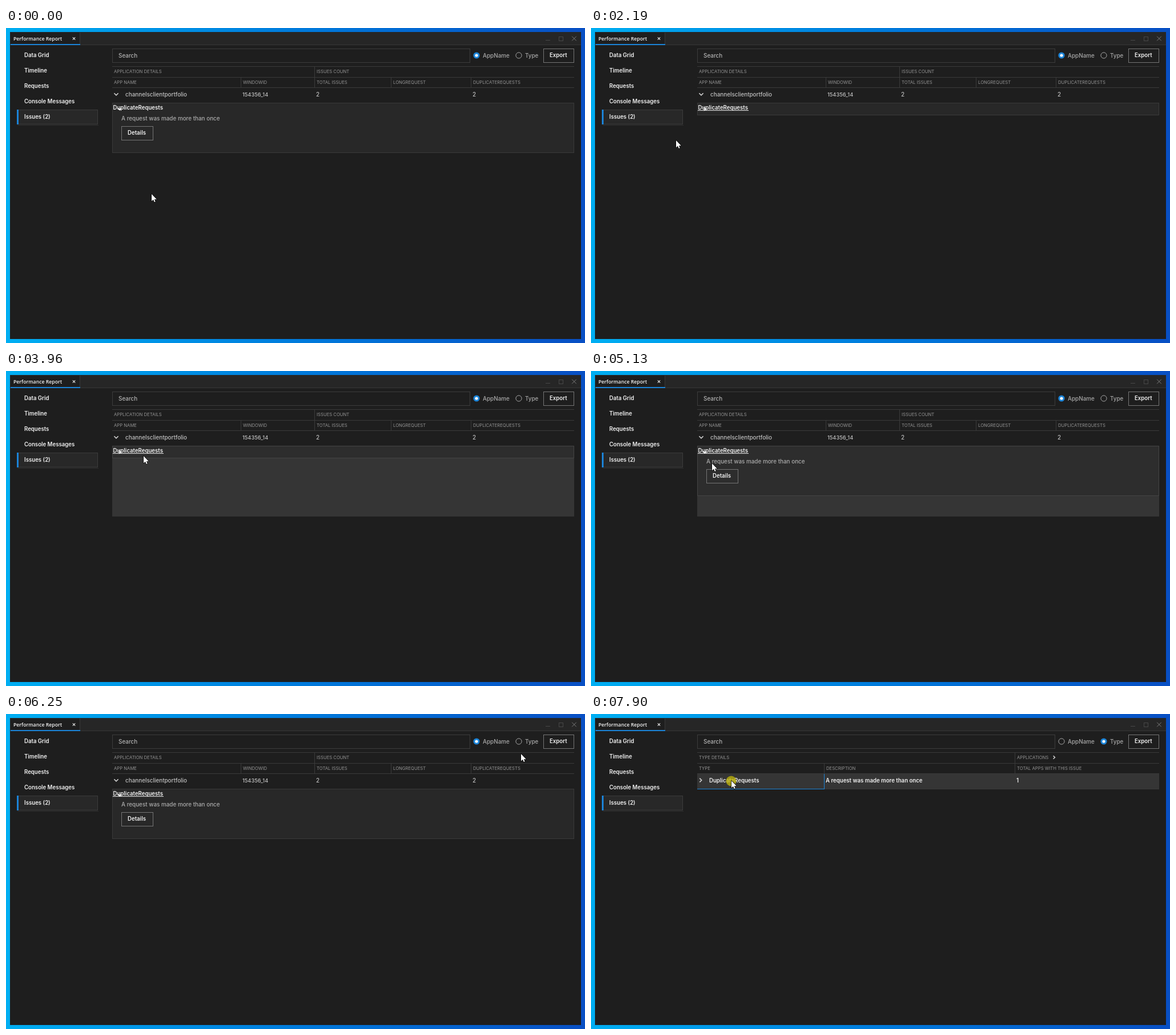
An HTML page with a canvas for the animation above (8000 ms loop, 1014 by 552 pixels).

```html
<!DOCTYPE html>
<html lang="en">
<head>
<meta charset="utf-8">
<title>Performance Report</title>
<style>
html, body { margin: 0; width: 100%; height: 100%; overflow: hidden; background: #1e1e1e; }
canvas { display: block; width: 1014px; height: 552px; }
</style>
</head>
<body>
<canvas id="stage" width="1014" height="552"></canvas>
<script>
const ctx = document.getElementById('stage').getContext('2d');
const LOOP = 8000;
const SANS = 'Inter, sans-serif';
const BLUE = '#1b84d8', LINE = '#3a3a3a', BG = '#1e1e1e';
const FONT = {
  tab: '600 8.7px "Open Sans", sans-serif',
  strong: '600 9.65px ' + SANS,
  body: '500 9.9px ' + SANS,
  id: '500 9.2px ' + SANS,
  head: '400 7.7px ' + SANS
};

// Pointer path: time, x, y of the hotspot
const PATH = [
  [0, 255, 291], [530, 255, 291], [1320, 230, 141], [1660, 230, 141],
  [2400, 106, 225], [2530, 82, 238], [2950, 258, 163], [3080, 258, 163],
  [3230, 178, 214], [3360, 140, 240], [3500, 140, 240], [3960, 241, 149],
  [4050, 231, 138], [4950, 231, 138], [5550, 146, 246], [5950, 146, 246],
  [6040, 501, 170], [6250, 902, 70], [6740, 897, 45], [6880, 897, 45],
  [7640, 245, 118], [7670, 246, 117], [8000, 246, 117]
];
const CLICKS = [[1620, 1740], [4250, 4390], [6740, 6850], [7900, 8000]];
const HOVERS = [[820, 1980], [2640, 3230], [3620, 5200]];
const COLLAPSE = 1680, EXPAND = 4320, LINKED = 1230, SWITCH = 6850, SELECT = 7900;

const clamp = v => Math.max(0, Math.min(1, v));

function slope(i, k) {
  const a = PATH[i], b = PATH[i + 1];
  return (b[k] - a[k]) / (b[0] - a[0]);
}

// Tangent that never overshoots and rests at pauses
function tangent(i, k) {
  if (i === 0 || i === PATH.length - 1) return 0;
  const p = slope(i - 1, k), q = slope(i, k);
  return p * q > 0 ? 2 * p * q / (p + q) : 0;
}

function pointer(t) {
  let i = 0;
  while (i < PATH.length - 2 && PATH[i + 1][0] <= t) i++;
  const a = PATH[i], b = PATH[i + 1], d = b[0] - a[0], u = (t - a[0]) / d;
  return [1, 2].map(k => {
    const u2 = u * u, u3 = u2 * u;
    return a[k] * (2 * u3 - 3 * u2 + 1) + b[k] * (3 * u2 - 2 * u3)
      + d * (tangent(i, k) * (u3 - 2 * u2 + u) + tangent(i + 1, k) * (u3 - u2));
  });
}

function hoverAmount(t) {
  return HOVERS.reduce((m, [on, off]) =>
    Math.max(m, Math.min(clamp((t - on) / 300), 1 - clamp((t - off) / 130))), 0);
}

function rect(x, y, w, h, color) {
  ctx.fillStyle = color;
  ctx.fillRect(x, y, w, h);
}

function frame(x, y, w, h, color) {
  ctx.strokeStyle = color;
  ctx.lineWidth = 1;
  ctx.strokeRect(x + 0.5, y + 0.5, w - 1, h - 1);
}

function text(s, x, y, font, color) {
  ctx.font = FONT[font];
  ctx.fillStyle = color;
  ctx.fillText(s, x, y);
}

function stroke(points, color, width) {
  ctx.strokeStyle = color;
  ctx.lineWidth = width;
  ctx.beginPath();
  points.forEach(([x, y]) => ctx.lineTo(x, y));
  ctx.stroke();
}

function chevron(x, y, r, down, color = '#d0d0d0') {
  const h = r / 2;
  stroke(down ? [[x - r, y - h], [x, y + h], [x + r, y - h]]
              : [[x - h, y - r], [x + h, y], [x - h, y + r]], color, 1.6);
}

function cross(x, y, r, color, width) {
  stroke([[x - r, y - r], [x + r, y + r]], color, width);
  stroke([[x + r, y - r], [x - r, y + r]], color, width);
}

function disc(x, y, r, color) {
  ctx.fillStyle = color;
  ctx.beginPath();
  ctx.arc(x, y, r, 0, 7);
  ctx.fill();
}

function radio(x, y, on) {
  if (on) {
    disc(x, y, 5.6, BLUE);
    disc(x, y, 2.6, '#fff');
    return;
  }
  ctx.strokeStyle = '#a4a4a4';
  ctx.lineWidth = 1;
  ctx.beginPath();
  ctx.arc(x, y, 5.1, 0, 7);
  ctx.stroke();
}

function button(label, x, y, w, h) {
  frame(x, y, w, h, '#757575');
  text(label, x + 11, y + 15, 'strong', '#f2f2f2');
}

function drawWindow() {
  const sky = ctx.createLinearGradient(0, 0, 1014, 0);
  sky.addColorStop(0, '#00aef2');
  sky.addColorStop(0.5, '#007bdc');
  sky.addColorStop(1, '#084fc4');
  rect(0, 0, 1014, 552, sky);
  rect(7, 7, 1000, 538, BG);
  rect(7, 7, 1000, 22, '#262626');
  rect(7, 29, 1000, 1, '#363636');
  rect(8, 8, 122, 20, BG);
  rect(129, 8, 1, 20, '#383838');
  rect(8, 28, 122, 2, BLUE);
  text('Performance Report', 13, 22, 'tab', '#f4f4f4');
  cross(119, 18.5, 2.2, '#e8e8e8', 1.2);
  rect(945, 21, 8, 1, '#484848');
  frame(968, 15, 8, 8, '#484848');
  cross(995, 18.5, 3.8, '#7c7c7c', 1);
}

function drawNav() {
  rect(19, 143, 142, 26, '#282828');
  frame(19, 143, 142, 26, '#3c3c3c');
  rect(19, 143, 3, 26, BLUE);
  rect(20, 170, 142, 1, '#303030');
  ['Data Grid', 'Timeline', 'Requests', 'Console Messages', 'Issues (2)'].forEach((s, i) =>
    text(s, 32, 51.4 + i * 27, 'strong', '#f2f2f2'));
}

function drawToolbar(byType) {
  frame(186, 36, 627, 25, '#3c3c3c');
  text('Search', 197, 52, 'body', '#b4b4b4');
  radio(824, 48, !byType);
  text('AppName', 835, 51.5, 'body', '#a8a8a8');
  radio(898, 48, byType);
  text('Type', 909, 51.5, 'body', '#a8a8a8');
  button('Export', 941, 36, 54, 25);
}

// Two header rows; cells are [label, x], rules are x positions
function drawHeader(top, cells, tall, short) {
  [67, 86, 104].forEach(y => rect(186, y, 809, 1, LINE));
  rect(tall, 67, 1, 38, LINE);
  short.forEach(x => rect(x, 86, 1, 18, LINE));
  top.forEach(([s, x]) => text(s, x, 79, 'head', '#959595'));
  cells.forEach(([s, x]) => text(s, x, 98.4, 'head', '#959595'));
}

function drawAppView(t) {
  const open = t < COLLAPSE || t >= EXPAND;
  const hover = hoverAmount(t);
  const shade = Math.round(40 + 5 * hover);
  const height = open ? 88 : 22;
  drawHeader([['APPLICATION DETAILS', 189], ['ISSUES COUNT', 544]],
    [['APP NAME', 189], ['WINDOWID', 415], ['TOTAL ISSUES', 544],
     ['LONGREQUEST', 678], ['DUPLICATEREQUESTS', 818]], 540, [411, 674, 814]);
  chevron(193, 116, 3.6, true);
  text('channelsclientportfolio', 209, 120, 'body', '#c0c0c0');
  text('154356_14', 414, 120, 'id', '#c0c0c0');
  text('2', 543, 120, 'body', '#c0c0c0');
  text('2', 817, 120, 'body', '#c0c0c0');

  rect(186, 132, 809, 123, `rgba(53,53,53,${hover})`);
  rect(186, 131, 809, height, `rgb(${shade},${shade},${shade})`);
  frame(186, 131, 809, height, hover > 0.5 ? '#444' : LINE);
  text('DuplicateRequests', 187.5, 143, 'strong', '#f4f4f4');
  chevron(199, 142, 3, open, '#fff');
  if (t >= LINKED) rect(187, 144, 89, 1, '#e8e8e8');
  if (open) {
    text('A request was made more than once', 202, 162, 'body', '#acacac');
    button('Details', 202, 172, 56, 25);
  }
}

function drawTypeView(t, y) {
  const hover = y > 104 && y < 132 && t > 7200;
  const font = hover ? 'strong' : 'body', color = hover ? '#f2f2f2' : '#c0c0c0';
  if (hover) rect(186, 105, 809, 26, '#353535');
  drawHeader([['TYPE DETAILS', 189], ['APPLICATIONS', 746]],
    [['TYPE', 189], ['DESCRIPTION', 412], ['TOTAL APPS WITH THIS ISSUE', 746]], 742, [408]);
  rect(186, 131, 809, 1, LINE);
  chevron(811, 76, 2.8, false);
  chevron(192, 116, 3.4, false);
  text('DuplicateRequests', 207, 120, font, color);
  text('A request was made more than once', 411, 120, font, color);
  text('1', 745, 120, font, color);
  if (t >= SELECT) {
    rect(186, 131, 223, 1, BLUE);
    rect(408, 105, 1, 27, BLUE);
  }
}

const ARROW = new Path2D('M0 0V12.5L2.9 9.8 4.8 14 6.7 13.2 4.9 9.2H8.9Z');
const HAND = new Path2D('M-1.4 1Q0 -.8 1.4 1V4.6Q3 3.8 3.8 5.2 5.4 4.5 6 6 7.8 5.6 7.8 7.5'
  + 'V10.5L6.4 15H.2L-1 12.4 -4 8.8Q-4.4 6.8 -2.6 7.2L-1.4 8.6Z');

function drawPointer(x, y, hand) {
  ctx.save();
  ctx.translate(x, y);
  ctx.lineJoin = 'round';
  ctx.lineWidth = 1.4;
  ctx.strokeStyle = '#000';
  ctx.fillStyle = '#fff';
  const shape = hand ? HAND : ARROW;
  ctx.stroke(shape);
  ctx.fill(shape);
  ctx.restore();
}

function draw(t) {
  const [x, y] = pointer(t);
  const byType = t >= SWITCH;
  drawWindow();
  drawNav();
  drawToolbar(byType);
  if (byType) drawTypeView(t, y);
  else drawAppView(t);
  if (CLICKS.some(([a, b]) => t >= a && t < b)) disc(x - 0.5, y + 0.5, 9, 'rgba(190,180,10,0.78)');
  const onLink = !byType && x > 187 && x < 276 && y > 133 && y < 147;
  drawPointer(Math.round(x), Math.round(y), onLink);
}

const start = performance.now();
function tick(now) {
  draw(Math.max(0, now - start) % LOOP);
  requestAnimationFrame(tick);
}
draw(0);
requestAnimationFrame(tick);
</script>
</body>
</html>
```
